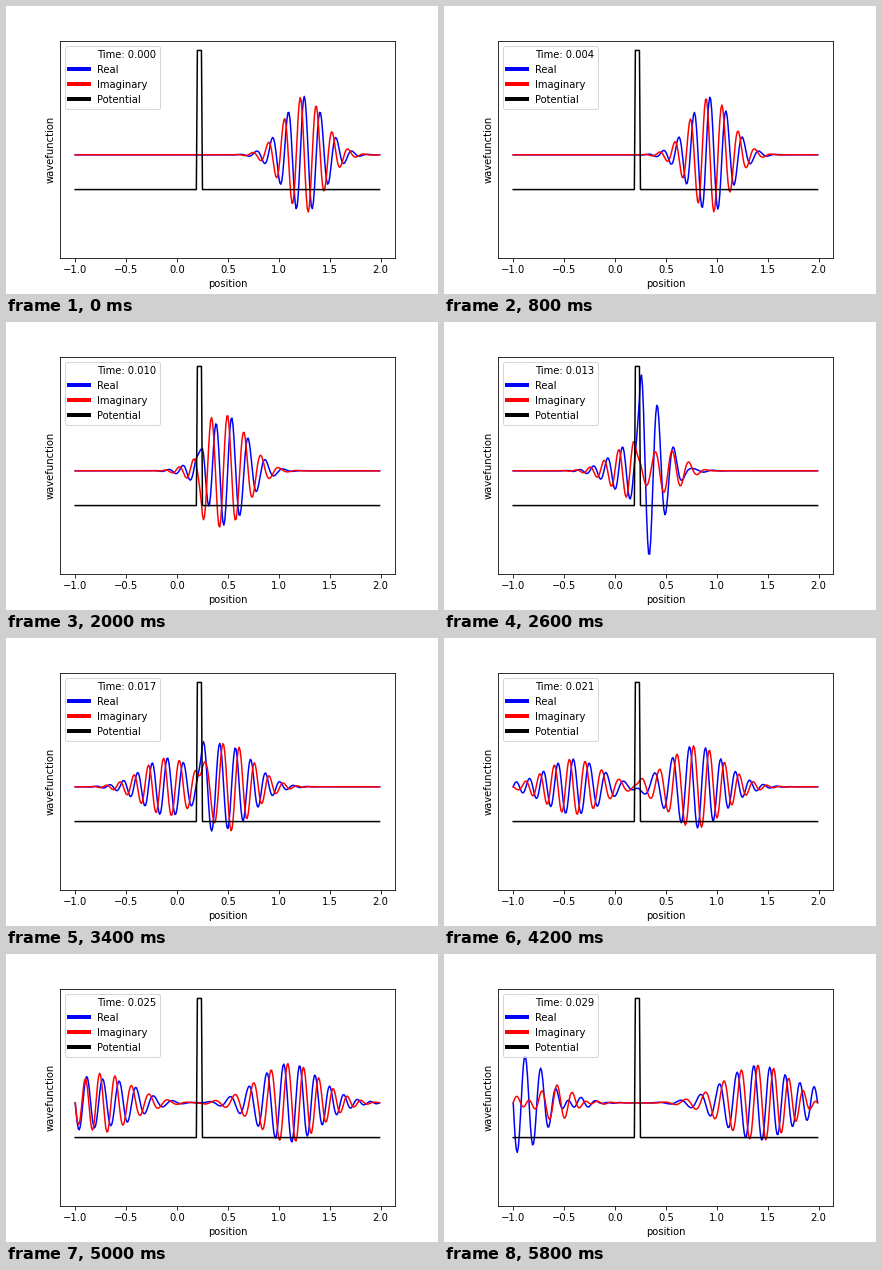
Recreate the animation shown at these times as a matplotlib script. Size 432 by 288 pixels, loop 6000 ms.

```python
import numpy as np
import matplotlib.pyplot as plt
from matplotlib.animation import FuncAnimation
from matplotlib.lines import Line2D

plt.rcParams["font.family"] = "DejaVu Sans"

FRAMES, STEP = 30, 0.001
DX = 0.01
X0, SIGMA, K0 = 1.25, 0.2, 40.0
V0 = 2000.0

x = -1 + DX * np.arange(300)
wall = (x > 0.195) & (x < 0.245)


def evolve():
    """Wave packet hitting a barrier, i psi' = -psi_xx + V psi, closed ends."""
    inner = slice(1, -1)
    n = len(x) - 2
    lap = (np.eye(n, k=1) + np.eye(n, k=-1) - 2 * np.eye(n)) / DX**2
    energy, modes = np.linalg.eigh(np.diag(V0 * wall[inner]) - lap)
    packet = np.exp(-(x - X0) ** 2 / (2 * SIGMA**2) - 1j * K0 * (x - X0))
    packet /= np.sqrt(np.sum(np.abs(packet) ** 2) * DX)
    coef = modes.T @ packet[inner]
    t = STEP * np.arange(FRAMES)
    psi = np.zeros((FRAMES, len(x)), complex)
    psi[:, inner] = (np.exp(-1j * np.outer(t, energy)) * coef) @ modes.T
    return psi


psi = evolve()
barrier = np.where(wall, 3.0, -1.0)
low = min(psi.real.min(), psi.imag.min())
pad = 0.05 * (3 - low)

fig, ax = plt.subplots(figsize=(6, 4), dpi=72)
fig.subplots_adjust(left=0.125, right=0.9, bottom=0.125, top=0.88)
real, = ax.plot(x, psi[0].real, color="blue")
imag, = ax.plot(x, psi[0].imag, color="red")
ax.plot(x, barrier, color="black")
ax.set_ylim(low - pad, 3 + pad)
ax.set_yticks([])
ax.set_xlabel("position")
ax.set_ylabel("wavefunction")

keys = [Line2D([], [], color=c, lw=4) for c in ("white", "blue", "red", "black")]
legend = ax.legend(keys, ["Time: 0.000", "Real", "Imaginary", "Potential"],
                   loc="upper left")
clock = legend.get_texts()[0]


def update(i):
    real.set_ydata(psi[i].real)
    imag.set_ydata(psi[i].imag)
    clock.set_text(f"Time: {i * STEP:.3f}")
    return real, imag, clock


anim = FuncAnimation(fig, update, frames=FRAMES, interval=200, repeat=True)
plt.show()
```
